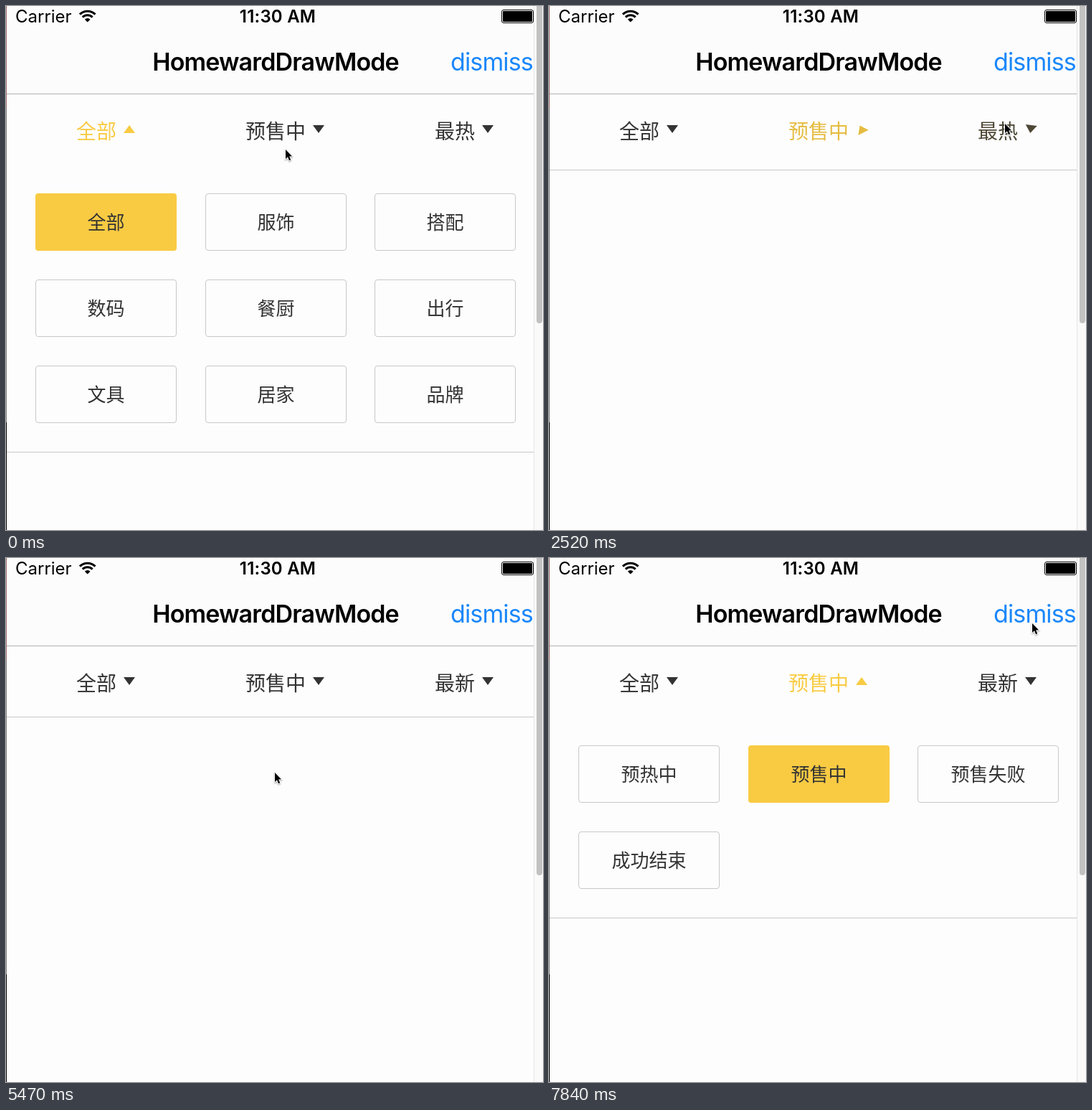
Animation of 749 by 730 pixels, one loop 7990 ms. Source, as an HTML page with a canvas:

```html
<!DOCTYPE html>
<html lang="zh-CN">
<head>
<meta charset="utf-8">
<style>
html, body { margin: 0; width: 100%; height: 100%; overflow: hidden; background: #fdfdfd; }
canvas { display: block; }
</style>
</head>
<body>
<canvas width="749" height="730"></canvas>
<script>
const c = document.querySelector('canvas').getContext('2d');
const LOOP = 7990, TICKS = 54, TICK = LOOP / TICKS;
const LATIN = 'Inter, "Liberation Sans", sans-serif';
const CJK = '"Noto Sans CJK SC", "Noto Sans CJK JP", "Noto Sans CJK", sans-serif';
const DARK = [51, 51, 51], GOLD = [249, 203, 67];

const menus = [
  ['全部', '服饰', '搭配', '数码', '餐厨', '出行', '文具', '居家', '品牌'],
  ['预热中', '预售中', '预售失败', '成功结束'],
  ['最热', '最新', '价格']
];

// which menu is open between which ticks
const visits = [
  { menu: 0, from: -9, to: 3 },
  { menu: 1, from: 3, to: 17 },
  { menu: 2, from: 17, to: 33 },
  { menu: 1, from: 44.21, to: 99 }
];

// each stroke curves from the last end point, past bend, to end
const HOME = [390, 200];
const strokes = [
  { from: 1, ticks: 3, bend: [393, 180], end: [395, 172] },
  { from: 9, ticks: 4, bend: [520, 187], end: [636, 164] },
  { from: 23, ticks: 3, bend: [668, 128], end: [629, 106] },
  { from: 26, ticks: 6, bend: [455, 300], end: [366, 299] },
  { from: 37, ticks: 1, bend: [370, 300], end: [375, 299] },
  { from: 38, ticks: 4, bend: [465, 225], end: [354, 174] },
  { from: 50, ticks: 4, bend: [500, 200], end: [674, 91] }
];

const clamp = v => Math.min(1, Math.max(0, v));

function ease(v) {
  const p = clamp(v);
  return p * p * (3 - 2 * p);
}

// closing runs slightly ahead of opening
function openness({ from, to }, k) {
  return ease((k - from + .26) * TICK / 308) - ease((k - to + .46) * TICK / 277);
}

function pointerAt(k) {
  let pos = HOME;
  for (const { from, ticks, bend, end } of strokes) {
    const t = clamp((k - from + 1) / ticks), u = 1 - t;
    pos = pos.map((p, i) => u * u * p + 2 * u * t * bend[i] + t * t * end[i]);
  }
  return pos.map(Math.round);
}

function rect(x, y, w, h, color) {
  c.fillStyle = color;
  c.fillRect(x, y, w, h);
}

function round(x, y, w, h, r, fill, stroke) {
  c.beginPath();
  c.roundRect(x, y, w, h, r);
  if (fill) { c.fillStyle = fill; c.fill(); }
  if (stroke) { c.strokeStyle = stroke; c.lineWidth = 1; c.stroke(); }
}

function text(s, x, y, font, color, align = 'left', spacing = 0) {
  c.font = font;
  c.fillStyle = color;
  c.textAlign = align;
  c.letterSpacing = spacing + 'px';
  c.fillText(s, x, y);
}

function polygon(points) {
  c.beginPath();
  points.forEach(([x, y]) => c.lineTo(x, y));
  c.closePath();
}

function drawFrame() {
  rect(0, 0, 749, 730, '#fdfdfd');
  rect(0, 0, 736, 122, '#fcfcfc');
  rect(0, 122, 736, 1, '#b2b2b2');
  rect(0, 0, 1, 143, '#a4716a');
  rect(0, 143, 1, 437, '#808080');
  rect(0, 580, 1, 150, '#000');
  rect(736, 0, 13, 730, '#fafafa');
  rect(736, 0, 1, 730, '#e6e6e6');
  round(740, -10, 8, 452, 4, '#c1c1c1');

  text('Carrier', 13, 23, '24px ' + LATIN, '#000');
  text('11:30 AM', 379, 23, '600 24px ' + LATIN, '#000', 'center', .2);
  text('HomewardDrawMode', 376, 90, '600 34px ' + LATIN, '#000', 'center', -.86);
  text('dismiss', 620, 90, '34px ' + LATIN, '#1a87fb', 'left', -.86);

  c.strokeStyle = '#000';
  for (const [r, w] of [[15.3, 3], [9.7, 3], [2.7, 5.4]]) {
    c.beginPath();
    c.arc(113.7, 22.5, r, -Math.PI * .75, -Math.PI * .25);
    c.lineWidth = w;
    c.stroke();
  }
  round(691.5, 5.5, 44, 18, 2.5, '#fff', '#000');
  round(693, 7, 41, 15, 1, '#000');
}

function drawTab(title, m, amount) {
  const mix = amount ** .65;
  const color = `rgb(${DARK.map((d, i) => Math.round(d + (GOLD[i] - d) * mix))})`;
  const width = 28 * title.length;
  const x = 139 + 250 * m - (width + 26) / 2;
  text(title, x, 185, '28px ' + CJK, color);
  c.save();
  c.translate(x + width + 18, 171.5);
  c.rotate(amount * Math.PI);
  polygon([[-8, -5.5], [8, -5.5], [0, 5.5]]);
  c.fill();
  c.restore();
}

function drawPanel(cells, title, amount) {
  const h = Math.round(amount * (Math.ceil(cells.length / 3) * 120 + 40));
  c.save();
  c.beginPath();
  c.rect(1, 222, 735, h);
  c.clip();
  cells.forEach((label, i) => {
    const x = Math.round(41 + 236.5 * (i % 3)), y = 261 + 120 * Math.floor(i / 3);
    if (label === title) round(x, y, 197, 80, 4, '#f9cb43');
    else round(x + .5, y + .5, 196, 79, 3.5, null, '#c8c8c8');
    text(label, x + 98.5, y + 50, '26px ' + CJK, '#333', 'center');
  });
  c.restore();
  rect(1, 221 + h, 735, 1, '#c8c8c8');
}

function drawPointer(k) {
  c.save();
  c.translate(...pointerAt(k));
  polygon([[0, 0], [0, 13], [3, 10.3], [5, 15.2], [7.2, 14.2], [5.2, 9.5], [9, 9.2]]);
  c.shadowColor = 'rgba(0,0,0,.4)';
  c.shadowBlur = 2;
  c.shadowOffsetY = 1;
  c.strokeStyle = '#fff';
  c.lineWidth = 1.8;
  c.stroke();
  c.shadowColor = 'transparent';
  c.fillStyle = '#000';
  c.fill();
  c.restore();
}

function draw() {
  // the picture advances in even steps
  const k = Math.min(TICKS - 1, Math.floor((performance.now() % LOOP + 12) / TICK));
  const titles = ['全部', '预售中', k < 33 ? '最热' : '最新'];
  drawFrame();
  titles.forEach((title, m) => {
    const amounts = visits.filter(v => v.menu === m).map(v => openness(v, k));
    drawTab(title, m, clamp(Math.max(...amounts)));
  });
  const visit = visits.findLast(v => v.from <= k);
  drawPanel(menus[visit.menu], titles[visit.menu], openness(visit, k));
  drawPointer(k);
  requestAnimationFrame(draw);
}
draw();
</script>
</body>
</html>
```
